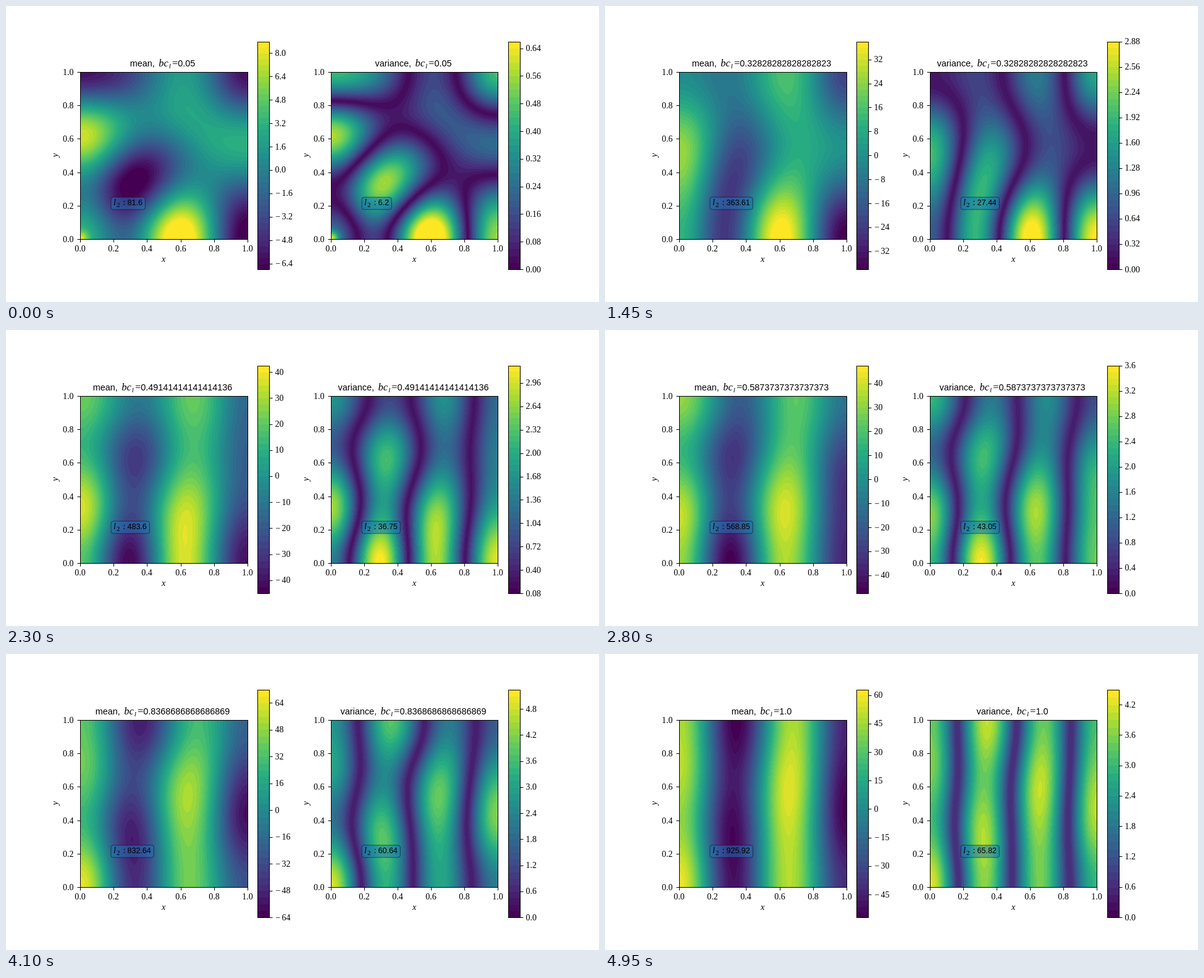
Animation of 960 by 480 pixels, one loop 5 s. Source, as an HTML page with a canvas:

```html
<!DOCTYPE html>
<html lang="en">
<head>
<meta charset="utf-8">
<title>Mean and variance</title>
<style>
  html, body { margin: 0; width: 100%; height: 100%; overflow: hidden; background: #fff; }
  canvas, svg { position: absolute; left: 0; top: 0; width: 960px; height: 480px; }
  .tick { font: 14px "Liberation Serif", serif; }
  .title { font: 14.4px "Liberation Sans", sans-serif; white-space: pre; }
  .norm { font: 12.5px "Liberation Sans", sans-serif; }
  .math { font: italic 14px "Liberation Serif", serif; }
  .big { font-size: 16.5px; }
  .sub { font-size: 11px; }
  .up { font-style: normal; }
  .line { fill: none; stroke: #000; }
  .box { fill: #1f77b4; fill-opacity: .5; stroke: #000; stroke-opacity: .5; }
</style>
</head>
<body>
<canvas id="paint" width="960" height="480"></canvas>
<svg viewBox="0 0 960 480"><g id="axes"></g><g id="labels"></g></svg>
<script>
const FRAMES = 100, FRAME_MS = 50;
const TOP = 107, SIZE = 271, BAR_TOP = 58, BAR_H = 370;
const { PI, sin, cos, exp, sqrt, hypot, abs, min, max, floor, ceil, round } = Math;
const ctx = document.getElementById('paint').getContext('2d');
const axes = document.getElementById('axes');
const labels = document.getElementById('labels');

const PANELS = [
  { name: 'mean', left: 120, width: 271, bar: 407 },
  { name: 'variance', left: 526, width: 270, bar: 813 }
];

const VIRIDIS = ['#440154', '#472c7a', '#3b518b', '#2c718e', '#21908d',
  '#27ad81', '#5cc863', '#aadc32', '#fde725']
  .map(hex => [1, 3, 5].map(i => parseInt(hex.slice(i, i + 2), 16)));

// Readings at a few steps of the sweep.
const STEPS = [0, 14, 29, 46, 68, 82, 99];
const LOW = [-6.6, -24.8, -37.2, -42.6, -53, -62, -56];
const HIGH = [8.7, 29.2, 37.7, 41.5, 54.6, 70.5, 61.5];
const NORM = [81.6, 271.3, 363.61, 483.6, 680.61, 832.64, 925.92];
const VAR_NORM = [6.2, 20.52, 27.44, 36.75, 50.99, 60.64, 65.82];

const clamp = (v, lo, hi) => min(hi, max(lo, v));

function viridis(u) {
  const p = u * 8, i = min(7, floor(p));
  return VIRIDIS[i].map((c, k) => round(c + (VIRIDIS[i + 1][k] - c) * (p - i)));
}

// Smooth curve through the readings.
function curve(values, s) {
  const last = STEPS.length - 1;
  let k = 0;
  while (k < last - 1 && s >= STEPS[k + 1]) k++;
  const slope = i => {
    const a = max(0, i - 1), b = min(last, i + 1);
    return (values[b] - values[a]) / (STEPS[b] - STEPS[a]);
  };
  const h = STEPS[k + 1] - STEPS[k], u = (s - STEPS[k]) / h, w = 1 - u;
  return values[k] * (1 + 2 * u) * w * w + values[k + 1] * u * u * (3 - 2 * u) +
    h * u * w * (slope(k) * w - slope(k + 1) * u);
}

const UNIT = Array.from({ length: SIZE }, (_, i) => i / (SIZE - 1));
const COS = [0, 1, 2, 3, 4].map(m => UNIT.map(p => cos(m * PI * p)));
const CORNER = UNIT.map(p => exp(-((p / .045) ** 2)));

// Standing waves: stripes grow with b while the cross modes swing to and fro.
function waves(b) {
  const stripe = 50.5 * b, tilt = 36 * b * (1 - b);
  const cross = -13.6 * sin(1.86 * PI * b);
  const rows = 5.5 * sin(2 * PI * b / .7);
  const edge = sin(2.4 * b), skew = 2.2 * sin(1.2 * PI * b);
  const corner = 8 * exp(-b / .1);
  const out = new Float64Array(SIZE * SIZE);
  for (let r = 0, i = 0; r < SIZE; r++) {
    const j = SIZE - 1 - r;
    const y1 = COS[1][j], y2 = COS[2][j], y3 = COS[3][j];
    const a4 = edge * (2.5 + 4.3 * y1);
    const a3 = stripe + tilt * y1 - .17 * cross * y2;
    const a2 = cross * y2 - skew * y1 - a4;
    const a1 = .6 * rows * y3 + .13 * cross * y1 - 2.2 * sqrt(b);
    const a0 = rows * y3;
    for (let c = 0; c < SIZE; c++, i++)
      out[i] = a0 + a1 * COS[1][c] + a2 * COS[2][c] + a3 * COS[3][c] + a4 * COS[4][c] +
        corner * CORNER[c] * CORNER[j];
  }
  return out;
}

// Round contour levels, at most 41 bands, and every n-th as a tick.
function makeLevels(lo, hi) {
  const raw = (hi - lo) / 41, mag = 10 ** floor(Math.log10(raw));
  const step = mag * [1, 1.5, 2, 2.5, 3, 4, 5, 6, 8, 10].find(m => m * mag >= raw * .99999);
  const first = floor(lo / step), last = ceil(hi / step), count = last - first;
  const skip = ceil((count + 1) / 10);
  const ticks = [];
  for (let j = first <= 0 ? first + (-first) % skip : first; j <= last; j += skip)
    ticks.push({ value: j * step, at: (j - first) / count });
  const places = [0, 1, 2, 3].find(d =>
    ticks.every(t => abs(t.value - t.value.toFixed(d)) < 1e-7)) ?? 3;
  const colors = Array.from({ length: count }, (_, i) => viridis(i / (count - 1)));
  return { step, first, count, ticks, places, colors };
}

function paintPanel(panel, levels, values) {
  const image = ctx.createImageData(SIZE, SIZE);
  values.forEach((v, i) => {
    const band = clamp(floor(v / levels.step) - levels.first, 0, levels.count - 1);
    const [r, g, b] = levels.colors[band], o = i * 4;
    image.data[o] = r;
    image.data[o + 1] = g;
    image.data[o + 2] = b;
    image.data[o + 3] = 255;
  });
  ctx.putImageData(image, panel.left, TOP);
  const edge = i => round(BAR_TOP + BAR_H * (1 - i / levels.count));
  levels.colors.forEach((c, i) => {
    ctx.fillStyle = `rgb(${c})`;
    ctx.fillRect(panel.bar, edge(i + 1), 20, edge(i) - edge(i + 1));
  });
}

const text = (x, y, cls, body, more = '') =>
  `<text x="${x}" y="${y}" class="${cls}" ${more}>${body}</text>`;

function panelLabels({ left, bar, name }, levels, bc, norm) {
  let out = text(left + 133.5, 98, 'title',
    `${name}, <tspan class="math big" dx="2.5">bc</tspan><tspan class="math sub" dx="1" dy="3">l</tspan>` +
    `<tspan class="math big up" dx="2" dy="-3">=</tspan>${bc}`, 'text-anchor="middle"');
  for (const t of levels.ticks) {
    const y = BAR_TOP + (BAR_H - .5) * (1 - t.at);
    const num = abs(t.value).toFixed(levels.places);
    out += `<path class="line" d="M${bar + 20} ${floor(y) + .5}h4.5"/>`;
    out += t.value < -1e-9
      ? text(bar + 29.5, y + 4, 'tick', '−') + text(bar + 39.5, y + 4, 'tick', num)
      : text(bar + 28.5, y + 4, 'tick', num);
  }
  const num = String(round(norm * 100) / 100);
  const width = (num.length - 1) * 6.95 + 3.5;
  return out +
    `<rect class="box" x="${left + 50}" y="310" width="${31 + width}" height="20" rx="3.5"/>` +
    text(left + 54, 323, 'math', 'l') + text(left + 59, 326, 'math sub up', '2') +
    text(left + 69.5, 323, 'math up', ':') + text(left + 76.5, 323, 'norm', num);
}

function drawAxes() {
  let out = '';
  for (const { left, width, bar } of PANELS) {
    out += `<rect class="line" x="${left + .5}" y="107.5" width="${width}" height="271"/>`;
    out += `<rect class="line" x="${bar + .5}" y="58.5" width="19" height="369"/>`;
    for (let i = 0; i < 6; i++) {
      const x = left + round(i * width / 5) + .5, y = 378.5 - round(i * 54.2);
      const num = (i / 5).toFixed(1);
      out += `<path class="line" d="M${x} 379v4.5M${left} ${y}h-4.5"/>`;
      out += text(x - .5, 397.5, 'tick', num, 'text-anchor="middle"');
      out += text(left - 10.5, y + 4, 'tick', num, 'text-anchor="end"');
    }
    out += text(left + 135, 415, 'math', 'x', 'text-anchor="middle"');
    out += text(0, 0, 'math', 'y',
      `text-anchor="middle" transform="translate(${left - 36} 242) rotate(-90)"`);
  }
  axes.innerHTML = out;
}

function draw(step) {
  const b = step * (.95 / 99) + .05;
  const bc = step === FRAMES - 1 ? '1.0' : String(b);
  const lo = curve(LOW, step), hi = curve(HIGH, step);
  const ratio = .0752 - .004 * b ** 4;
  const mean = waves(b);
  const variance = mean.map(v => hypot(v * ratio, .6 * b));
  const show = (panel, values, levels, norm) => {
    paintPanel(panel, levels, values);
    return panelLabels(panel, levels, bc, norm);
  };
  labels.innerHTML =
    show(PANELS[0], mean, makeLevels(lo, hi), curve(NORM, step)) +
    show(PANELS[1], variance,
      makeLevels(.11 * sin(PI * min(b, 1)) ** 6, ratio * max(-lo, hi)), curve(VAR_NORM, step));
}

const begin = performance.now();
let shown = -1;

function tick() {
  const step = floor((performance.now() - begin) / FRAME_MS) % FRAMES;
  if (step !== shown) draw(shown = step);
  requestAnimationFrame(tick);
}

drawAxes();
tick();
</script>
</body>
</html>
```
